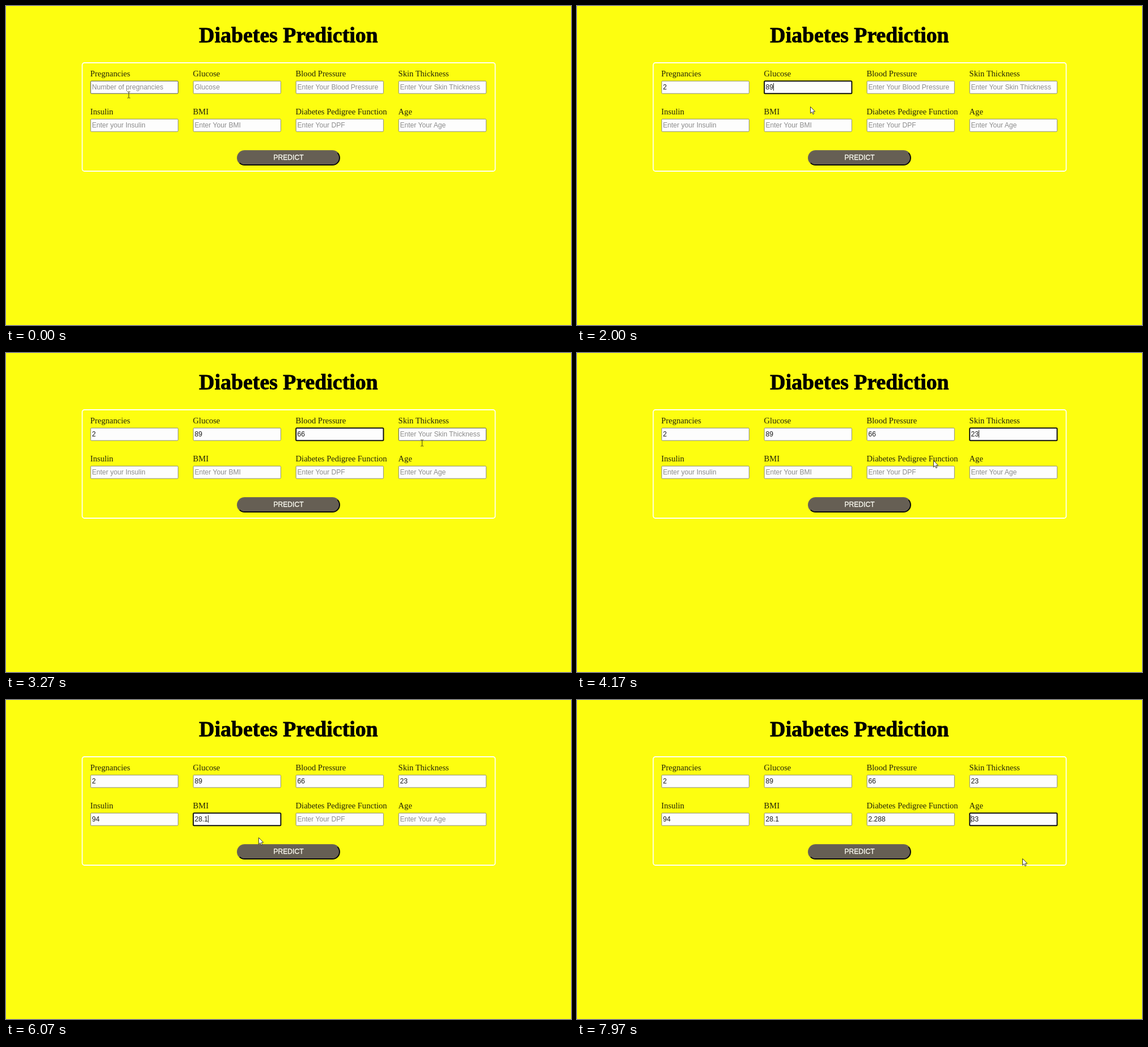
Recreate the animation shown at these times as an HTML page. Size 996 by 562 pixels, loop 8000 ms.

```html
<!DOCTYPE html>
<html lang="en">
<head>
<meta charset="utf-8">
<title>Diabetes Prediction</title>
<style>
  html, body { margin: 0; width: 100%; height: 100%; overflow: hidden; background: #fdfe10; }
  svg { position: absolute; left: 0; top: 0; }
  .button {
    position: absolute; box-sizing: border-box;
    left: 407px; top: 254px; width: 182px; height: 27px; border-radius: 14px;
    border: 2px solid; border-color: #6a6454 #0c0c08 #0c0c08 #6a6454; background: #665f54;
  }
  .panel { fill: none; stroke: #fffff0; stroke-width: 1.8px; }
  .title { font: bold 37.8px "Liberation Serif", serif; stroke: #000; stroke-width: .8px; }
  .label { font: 14.57px "Liberation Serif", serif; fill: #222208; }
  .text { font: 12.14px "Liberation Sans", sans-serif; }
  .action { fill: #fffff4; stroke: #fffff4; stroke-width: .3px; }
  .box { fill: #fdfdfd; }
</style>
</head>
<body>
<div class="button"></div>
<svg id="stage" width="996" height="562" viewBox="0 0 996 562">
  <rect class="panel" x="134.4" y="100" width="728" height="191" rx="4"/>
  <text class="title" x="498" y="64" text-anchor="middle">Diabetes Prediction</text>
  <text class="text action" x="498" y="271" text-anchor="middle">PREDICT</text>
</svg>
<script>
const LOOP = 8000;
const TYPE_FROM = 220, TYPE_FOR = 120;  // ms after a field gets the focus
const stage = document.getElementById('stage');

// After a click the pointer moves to `rest`, measured from the field's corner.
const fields = [
  { label: 'Pregnancies', hint: 'Number of pregnancies', focus: 340, steps: ['1', '2'], rest: [130, 67], caretFirst: true },
  { label: 'Glucose', hint: 'Glucose', focus: 1280, value: '89', rest: [81, 45] },
  { label: 'Blood Pressure', hint: 'Enter Your Blood Pressure', focus: 2420, value: '66', rest: [80, 67] },
  { label: 'Skin Thickness', hint: 'Enter Your Skin Thickness', focus: 3400, value: '23', rest: [80, 45] },
  { label: 'Insulin', hint: 'Enter your Insulin', focus: 4500, value: '94', rest: [131, 44] },
  { label: 'BMI', hint: 'Enter Your BMI', focus: 5680, value: '28.1', rest: [100, 45] },
  { label: 'Diabetes Pedigree Function', hint: 'Enter Your DPF', focus: 6430, value: '2.288', rest: [68, 104], caretFirst: true },
  { label: 'Age', hint: 'Enter Your Age', focus: 7380, value: '33', rest: [93, 80], caretFirst: true }
];

function add(tag, attrs, content = '') {
  const node = document.createElementNS(stage.namespaceURI, tag);
  for (const name in attrs) node.setAttribute(name, attrs[name]);
  node.textContent = content;
  return stage.appendChild(node);
}

fields.forEach((field, i) => {
  const x = field.x = 149 + 181 * (i % 4);
  const y = field.y = 132 + 67 * Math.floor(i / 4);
  field.steps ??= [...field.value].map((_, n) => field.value.slice(0, n + 1));
  add('text', { class: 'label', x: x - .4, y: y - 8.2 }, field.label);
  field.box = add('rect', { class: 'box', x: x + .2, y: y + .2, width: 154.2, height: 22, rx: 1.5 });
  field.text = add('text', { class: 'text', x: x + 2.4, y: y + 15 });
});

const caret = add('rect', { width: 1, height: 13, fill: '#222' });
const arrow = add('path', {
  d: 'M0 0V11.6L2.7 9.1 4.4 13.2 6.3 12.4 4.6 8.5H8.2Z',
  fill: '#fff', stroke: '#222', 'stroke-width': .9
});
const beam = add('path', {
  d: 'M-2.5 -5.5H-.7L0 -5 .7 -5.5H2.5M0 -5V5M-2.5 5.5H-.7L0 5 .7 5.5H2.5',
  fill: 'none', stroke: '#44430a'
});

function glide(from, to, p) {
  p = Math.min(1, Math.max(0, p));
  const ease = p * p * (3 - 2 * p);
  return from.map((value, i) => value + (to[i] - value) * ease);
}

// The pointer glides to each field, pauses for the click, then moves aside.
function pointerAt(t) {
  let point = [223, 156];
  for (const { x, y, focus, rest } of fields) {
    point = glide(point, [x + 41, y + 26], (t - focus + 420) / 280);
    point = glide(point, [x + rest[0], y + rest[1]], (t - focus - 40) / 310);
  }
  return point;
}

function typedAt(field, t) {
  const p = (t - field.focus - TYPE_FROM) / TYPE_FOR;
  const last = field.steps.length - 1;
  return p < 0 ? '' : field.steps[Math.min(last, Math.floor(p * last))];
}

const show = (node, visible) => node.setAttribute('visibility', visible ? 'visible' : 'hidden');

function draw(t) {
  const [px, py] = pointerAt(t);
  const active = fields.filter(field => t >= field.focus).pop();
  let overField = false;
  show(caret, false);

  for (const field of fields) {
    const { x, y, box, text } = field;
    // The pointer is drawn slightly below its real hot spot.
    const hovered = px >= x && px <= x + 154 && py > y + 3 && py < y + 27;
    const focused = field === active;
    const typed = typedAt(field, t);
    overField = overField || hovered;

    box.setAttribute('stroke', focused ? '#101010' : hovered ? '#505058' : '#8c8c78');
    box.setAttribute('stroke-width', focused ? 2 : 1);
    text.textContent = typed || field.hint;
    text.setAttribute('fill', typed ? '#1a1a1a' : '#8c8c8c');

    if (focused) {
      const sinceTyping = t - field.focus - TYPE_FROM - TYPE_FOR;
      const offset = typed && !field.caretFirst ? text.getComputedTextLength() : 0;
      caret.setAttribute('x', Math.round(x + 2 + offset));
      caret.setAttribute('y', y + 4);
      show(caret, sinceTyping % 1000 < 500);
    }
  }

  show(beam, overField);
  show(arrow, !overField);
  for (const pointer of [beam, arrow])
    pointer.setAttribute('transform', `translate(${Math.round(px) + .5} ${Math.round(py) + .5})`);
}

const start = performance.now();
function tick() {
  draw((performance.now() - start) % LOOP);
  requestAnimationFrame(tick);
}
tick();
</script>
</body>
</html>
```
